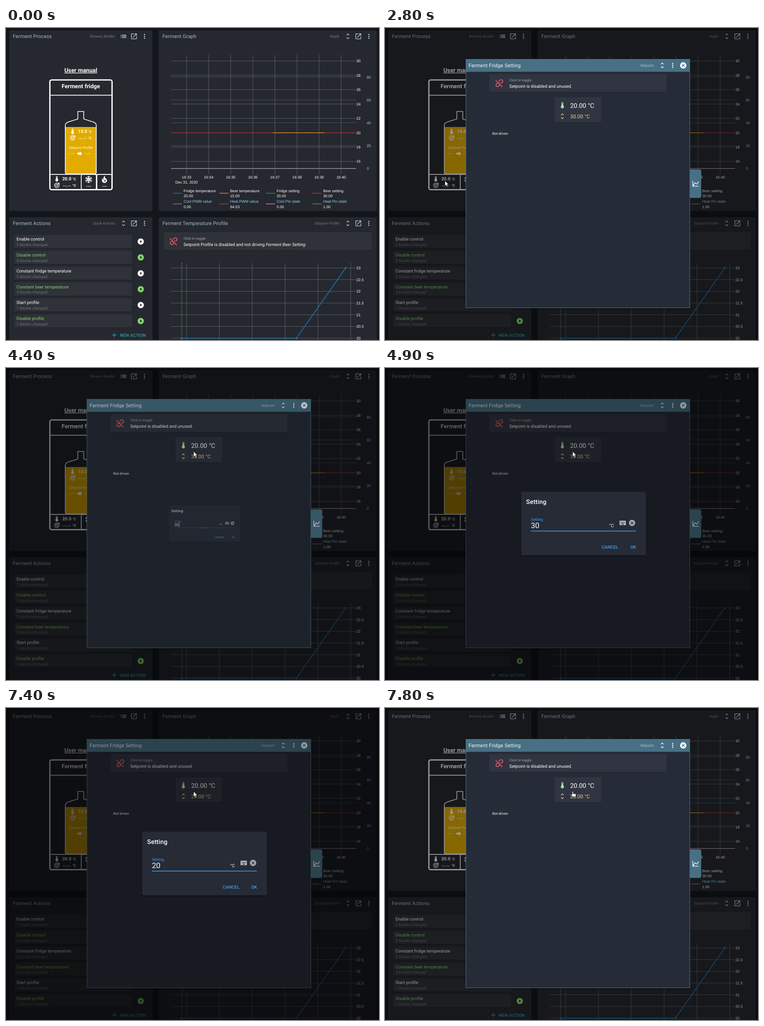
An HTML page for the animation above (8000 ms loop, 818 by 684 pixels).

```html
<!DOCTYPE html>
<html lang="en">
<head>
<meta charset="utf-8">
<title>Fermentation dashboard</title>
<style>
html, body { margin: 0; width: 100%; height: 100%; overflow: hidden; background: #13171c; }
svg { display: block; width: 100vw; height: 100vh; font-family: Roboto, sans-serif; text-rendering: geometricPrecision; }
.plot { font-family: "Liberation Sans", Arial, sans-serif; font-size: 8.3px; }
</style>
</head>
<body>
<svg id="stage" viewBox="0 0 818 684"></svg>
<script>
const PANEL = '#25282f', PAGE = '#13171c', TITLE = '#a3bdca', ICON = '#b4cbd6';
const GREEN = '#82d46b', TEAL = '#487084', BLUE = '#429ff0', SKY = '#93d5f3', RED = '#ef5f62';
const SERIES = ['#1f77b4', '#ff7f0e', '#2ca02c', '#d62728', '#9467bd', '#8c564b', '#e377c2', '#7f7f7f'];

const keys = [5, 8, 11, 14, 17].map(x => `M${x} 8h2v2h-2zM${x} 11h2v2h-2z`).join('');
const ICONS = {
  list: 'M3 13h2v-2H3zm0 4h2v-2H3zm0-8h2V7H3zm4 4h14v-2H7zm0 4h14v-2H7zM7 7v2h14V7z',
  open: 'M19 19H5V5h7V3H5a2 2 0 0 0-2 2v14a2 2 0 0 0 2 2h14a2 2 0 0 0 2-2v-7h-2zM14 3v2h3.59l-9.83 9.83 1.41 1.41L19 6.41V10h2V3z',
  more: [6, 12, 18].map(y => `M10 ${y}a2 2 0 1 0 4 0a2 2 0 1 0-4 0z`).join(''),
  unfold: 'M12 5.83L15.17 9l1.41-1.41L12 3 7.41 7.59 8.83 9zm0 12.34L8.83 15l-1.42 1.41L12 21l4.59-4.59L15.17 15z',
  play: 'M10 16.5v-9l6 4.5zM12 2a10 10 0 1 0 0 20a10 10 0 1 0 0-20z',
  close: 'M12 2a10 10 0 1 0 0 20a10 10 0 1 0 0-20zM17 15.6L15.6 17 12 13.4 8.4 17 7 15.6 10.6 12 7 8.4 8.4 7 12 10.6 15.6 7 17 8.4 13.4 12z',
  thermo: 'M15 13V5a3 3 0 0 0-6 0v8a5 5 0 1 0 6 0zM12 4a1 1 0 0 1 1 1v3h-2V5a1 1 0 0 1 1-1z',
  arrow: 'M4 15V9h8V4.16L19.84 12 12 19.84V15z',
  plus: 'M19 13h-6v6h-2v-6H5v-2h6V5h2v6h6z',
  chart: 'M16 11.78l4.24-7.33 1.73.99-5.23 9.06-6.51-3.75L5.46 19H22v2H2V3h2v14.54L9.5 8z',
  fire: 'M14 2C12.4 5 13.2 7.5 15 8.9C17.5 10.7 19 12.3 19 15A7 6.8 0 0 1 5 14.5C5 12 6 10 7.4 8.6C7 10.5 7.2 12.8 8.6 14C9.6 13.6 9 12.5 8.8 11.5C8.2 8 10.5 4 14 2ZM12.4 11C11.8 13 13 14 12.6 15.5C12.3 16.5 11.6 17 10.5 17.3C12 18.6 15.4 18.2 15.4 15C15.2 13.2 13 12.8 12.4 11Z',
  keyboard: 'M20 5H4a2 2 0 0 0-2 2v10a2 2 0 0 0 2 2h16a2 2 0 0 0 2-2V7a2 2 0 0 0-2-2zM8 15h8v2H8z' + keys
};

const icon = (name, x, y, fill = ICON, k = .69) =>
  `<path d="${ICONS[name]}" fill="${fill}" fill-rule="evenodd" transform="translate(${x} ${y}) scale(${k}) translate(-12 -12)"/>`;
const text = (x, y, s, size, fill = '#fff', more = '') =>
  `<text x="${x}" y="${y}" font-size="${size}" fill="${fill}" ${more}>${s}</text>`;
const label = (x, y, s, fill = '#fff', more = '') => `<text x="${x}" y="${y}" fill="${fill}" ${more}>${s}</text>`;
const box = (x, y, w, h, fill, more = '') =>
  `<rect x="${x}" y="${y}" width="${w}" height="${h}" fill="${fill}" ${more}/>`;
const stroke = (d, color, w = 1, more = '') =>
  `<path d="${d}" fill="none" stroke="${color}" stroke-width="${w}" ${more}/>`;
const range = (n, f) => Array.from({ length: n }, (_, i) => f(i)).join('');
const MID = 'text-anchor="middle"', END = 'text-anchor="end"', BOLD = 'font-weight="700"', ITALIC = 'font-style="italic"';

// A raised card with a soft lower edge
const card = (x, y, w, h, fill) =>
  box(x, y + 1.2, w, h, '#000', 'rx="2.5" opacity=".25"') + box(x, y, w, h, fill, 'rx="2.5"');

function panel(x, y, w, h, title, kind, first) {
  const r = x + w;
  const right = r - (w > 400 ? 82 : first === 'list' || first === 'unfold' ? 82 : 0);
  return box(x, y, w, h, PANEL, 'rx="2"') +
    text(x + 8, y + 17, title, 11.1, TITLE, 'letter-spacing=".1"') +
    text(right, y + 16, kind, 8.2, '#777a80', ITALIC + ' ' + END) +
    icon(first, r - 63.3, y + 13.3) + icon('open', r - 40.3, y + 13.3) + icon('more', r - 17.2, y + 13.3);
}

const target = (x, y) => `<g transform="translate(${x} ${y})">` +
  stroke('M1.6-4.9A5.2 5.2 0 1 0 5-1.4M.6-2.6A2.7 2.7 0 1 0 2.7-.5M0 0L3.6-3.6M3-5.8V-3H5.8L4.6-1.9M3-3L5.5-5.5', '#fff', 1.15) + '</g>';

function linkOff(x, y) {
  return `<g transform="translate(${x} ${y}) scale(.9) translate(-11.5 -12)" stroke-linejoin="round">` +
    stroke('M10 8.3L13.4 4.9a4 4 0 0 1 5.7 5.7L17.4 12.3M13 16.4L10.6 19.1a4 4 0 0 1-5.7-5.7L6.6 11.7M9.9 14.1A4 4 0 0 1 8.7 11.2M14.1 9.9A4 4 0 0 1 15.2 13.3M2.6 4.6L19.4 21.4', RED, 1.85) + '</g>';
}

function reading(x, y, value) {
  return icon('thermo', x - 22, y, '#fff', .6) + target(x - 22, y + 14.5) +
    text(x, y + 3.8, value, 9.9, '#fff', MID + ' ' + BOLD) +
    text(x, y + 18.2, '--.--', 9.3, '#fff', MID + ' ' + BOLD) +
    [3.3, 17.7].map(d => text(x + 12, y + d, '°C', 7.7, '#fff', BOLD)).join('');
}

function fridge() {
  const flake = range(6, i => `<path transform="rotate(${i * 60})" d="M0 0V-8M-2.6-7L0-4.7L2.6-7M-2-3.6L0-2L2-3.6"/>`);
  const bottle = 'M157.5 183H170.5V199.5L192 206.3Q198 208.6 198 214V316q0 4-4 4H134q-4 0-4-4V214Q130 208.6 136 206.3L157.5 199.5Z';
  return text(164, 97, 'User manual', 12.75, '#fff', MID + ' ' + BOLD + ' text-decoration="underline"') +
    text(164, 132, 'Ferment fridge', 12.65, '#fff', MID + ' ' + BOLD) +
    '<path d="M130 217H198V316q0 4-4 4H134q-4 0-4-4Z" fill="#e1ab00"/>' +
    stroke(bottle, '#fff', 1.6) +
    stroke('M96 147.3H232M96 320.8H232', '#fff', 1.7) +
    box(165, 321, 33, 33, 'none', 'rx="3.5" stroke="#fff" stroke-width="1.7"') +
    box(199.3, 321, 33, 33, 'none', 'rx="3.5" stroke="#fff" stroke-width="1.7"') +
    box(96.2, 113.8, 136.4, 240.6, 'none', 'rx="4" stroke="#fff" stroke-width="2.8"') +
    reading(168, 226.5, '15.0') + reading(133.4, 330.5, '20.0') +
    text(164, 264.5, 'Setpoint Profile', 7.66, '#fff', MID) +
    text(144, 278, '--.--', 9.8, '#fff', MID) + text(179, 278, '--.--', 9.8, '#fff', MID) +
    icon('arrow', 161.6, 275.3, '#fff', .66) +
    `<g transform="translate(181.3 332)" fill="none" stroke="#fff" stroke-width="1.2">${flake}</g>` +
    icon('fire', 216, 332, '#fff', .82) +
    text(181.3, 350, '---', 9.3, '#fff', MID + ' ' + BOLD) + text(216, 350, '---', 9.3, '#fff', MID + ' ' + BOLD);
}

function graph() {
  const times = range(8, i => {
    const x = 396 + i * 48.43;
    return stroke(`M${x} 59V321`, '#5b5e63') + label(x, 330, '16:' + (33 + i), '#fff', MID);
  });
  const left = range(8, i => {
    const y = 72.3 + i * 31.45;
    return stroke(`M362 ${y}H768`, '#5b5e63') + label(768.5, y + 3, 30 - 2 * i);
  });
  const right = range(5, i => {
    const y = 107.5 + i * 50.13;
    return stroke(`M362 ${y}H768`, '#465660') + label(i < 4 ? 791 : 791.3, y + 3, 80 - 20 * i, SKY);
  });
  const names = ['Fridge temperature', 'Beer temperature', 'Fridge setting', 'Beer setting',
    'Cool PWM value', 'Heat PWM value', 'Cool Pin state', 'Heat Pin state'];
  const values = ['20.00', '15.00', '20.00', '30.00', '0.00', '94.03', '0.00', '1.00'];
  const legend = range(8, i => {
    const x = 366 + (i % 4) * 102, y = i < 4 ? 360 : 383.3;
    return stroke(`M${x} ${y + 2.3}h20`, SERIES[i], 1.4) +
      label(x + 23.5, y, names[i], i < 4 ? '#fff' : SKY) + label(x + 23.5, y + 11.2, values[i]);
  });
  return '<g class="plot">' + right + left + times + label(396, 341, 'Dec 31, 2020', '#fff', MID) +
    stroke('M362 229.6H768', '#ab373b', 1.4) + stroke('M585 229.6H699', '#f0981e', 1.4) +
    stroke('M362 308H768', '#a18b93', 1.5) + legend + '</g>';
}

function actions() {
  const rows = [['Enable control', 2], ['Disable control', 3], ['Constant fridge temperature', 3],
    ['Constant beer temperature', 3], ['Start profile', 1], ['Disable profile', 1]];
  return rows.map(([name, n], i) => {
    const y = 453.6 + i * 34.84, color = i % 2 ? GREEN : '#fff';
    return card(18, y, 258, 28.8, '#2f3239') + text(23, y + 12.5, name, 9.58, color) +
      text(23, y + 24.3, n + ' blocks changed', 8.2, '#74777c', 'letter-spacing=".27"') +
      icon('play', 295.5, y + 14.5, color);
  }).join('') + icon('plus', 237.5, 673, '#309ba5') +
    text(249.7, 676.7, 'NEW ACTION', 9.5, '#309ba5', 'font-weight="500"');
}

function toggle(x, y, w, h, fill, message) {
  return card(x, y, w, h, fill) + linkOff(x + 21.4, y + h / 2) +
    text(x + 43.5, y + 15.7, 'Click to toggle', 7.7, '#a1a4a9') + text(x + 43.5, y + 30, message, 9.55);
}

function profile() {
  const rows = range(7, i => {
    const y = 526 + i * 25.67;
    return stroke(`M362 ${y}H768`, '#5b5e63') + label(768.5, y + 3, 23 - i / 2);
  });
  const dots = [[385, 680], [637, 680], [745, 526]];
  return toggle(345.7, 448, 456.5, 39, '#2f3239',
    'Setpoint Profile is disabled and not driving <tspan font-style="italic">Ferment Beer Setting</tspan>.') +
    '<g class="plot">' + range(6, i => stroke(`M${396 + i * 72} 515V684`, '#5b5e63')) + rows +
    stroke('M385.5 515V684', '#2fae35', 1.5, 'stroke-dasharray="2.2 2.2"') +
    stroke('M' + dots.join('L'), SERIES[0], 1.5) +
    dots.map(([x, y]) => `<circle cx="${x}" cy="${y}" r="2.1" fill="${SERIES[0]}"/>`).join('') + '</g>';
}

function settings() {
  return box(177, 70, 492, 547, '#000', 'rx="2" opacity=".25"') +
    '<path d="M668 310h21.500q4 0 4 4v54.500q0 4-4 4H668z" fill="' + TEAL + '"/>' + icon('chart', 681.3, 341.3, '#fff') +
    box(177.5, 68.500, 491, 545, '#262c37', `stroke="${TEAL}"`) + box(177, 68, 492, 28, TEAL) +
    text(183.3, 86, 'Ferment Fridge Setting', 11.1, '#f2f5f7', 'letter-spacing=".1"') +
    text(589, 84.600, 'Setpoint', 8.2, '#b1c3cc', ITALIC + ' ' + END) +
    icon('unfold', 608, 82, '#fff') + icon('more', 631, 82, '#fff') + icon('close', 654, 82, '#fff') +
    toggle(229, 101.300, 388, 39.200, '#303541', 'Setpoint is disabled and unused.') +
    card(372, 152, 102, 55, '#303541') + icon('thermo', 389, 169.500, '#b3deab') +
    text(406, 174.600, '20.00 °C', 14, '#fff') +
    icon('unfold', 389, 193.500, '#edd08a') + text(406, 198.300, '', 11.4, '#edd08a', 'id="value"') +
    text(235, 234, 'Not driven', 7.8, '#fff', ITALIC);
}

function editor() {
  return box(297.5, 273, 275, 140, '#000', 'rx="3" opacity=".3"') + box(298.5, 271.3, 273.700, 139.400, '#262b36', 'rx="2.500"') +
    text(309.500, 298, 'Setting', 13.7, '#fff', 'font-weight="500" letter-spacing=".15"') +
    text(320.300, 335.300, 'Setting', 8.3, BLUE) + text(320, 350.800, '', 16.6, '#fff', 'id="field"') +
    box(320, 335, 1, 20, '#fff', 'id="caret"') +
    '<g id="suffix">' + text(491.800, 348.600, '°C', 10) + icon('keyboard', 521.300, 339.700, '#c2c5c9') + '</g>' +
    `<g id="clear">${icon('close', 541.800, 339.700, '#a9abb0')}</g>` +
    stroke('M320 357.500H550', '#70757d', .7) +
    `<g id="underline">${stroke('M-115 0H115', BLUE, 1.500)}</g>` +
    text(475.300, 396.400, 'CANCEL', 9.6, BLUE, 'font-weight="500"') + text(538, 396.400, 'OK', 9.6, BLUE, 'font-weight="500"');
}

const stage = document.getElementById('stage');
stage.innerHTML = box(0, 0, 818, 684, PAGE) +
  panel(7, 5, 314, 396, 'Ferment Process', 'Brewery Builder', 'list') + fridge() +
  panel(335, 5, 478, 396, 'Ferment Graph', 'Graph', 'unfold') + graph() +
  panel(7, 415, 314, 280, 'Ferment Actions', 'Quick Actions', 'unfold') + actions() +
  panel(335, 415, 478, 280, 'Ferment Temperature Profile', 'Setpoint Profile', 'unfold') + profile() +
  `<g id="settings">${box(0, 0, 818, 684, '#000', 'opacity=".4"')}${settings()}</g>` +
  box(0, 0, 818, 684, '#000', 'id="shade"') + `<g id="editor">${editor()}</g>` +
  '<g id="cursor" stroke="#15181c" stroke-width=".7" fill="#fff" stroke-linejoin="round">' +
  '<path id="pointer" d="M0 0V11.300L2.600 8.900L4.300 13L6.200 12.200L4.400 8.200H8Z"/>' +
  '<path id="hand" d="M-.9.700Q.2-.9 1.300.700V4.600L6.200 5.500Q7.800 6 7.600 7.600L6.300 11.700H-.3L-3.300 7.300Q-3 5.800-1.800 6.500L-.9 7.400Z"/></g>';

const ui = {};
stage.querySelectorAll('[id]').forEach(n => ui[n.id] = n);
const show = (node, on) => node.setAttribute('display', on ? 'inline' : 'none');
const clamp = v => Math.min(1, Math.max(0, v));
const smooth = p => p * p * (3 - 2 * p);
const mix = (a, b, p) => a + (b - a) * p;

// CSS "ease": cubic-bezier(.25, .1, .25, 1), solved by bisection
function ease(x) {
  let lo = 0, hi = 1;
  const curve = (u, a, b) => 3 * u * (1 - u) ** 2 * a + 3 * u * u * (1 - u) * b + u ** 3;
  for (let i = 0; i < 24; i++) {
    const u = (lo + hi) / 2;
    if (curve(u, .25, .25) < x) lo = u; else hi = u;
  }
  return curve(lo, .1, 1);
}

function draw(time) {
  const t = Math.floor(time / 100) * 100;

  const go = smooth(clamp((t - 900) / 800)), next = smooth(clamp((t - 3100) / 600));
  const x = t < 3200 ? mix(29, 131.5, go) : mix(131.5, 411.500, next);
  const y = t < 1800 ? mix(2, 332, go) : mix(335, 183, next);
  const hand = (t >= 1800 && t < 2800) || (t >= 3800 && t < 4300) || t >= 7800;
  show(ui.cursor, t >= 900);
  show(ui.hand, hand);
  show(ui.pointer, !hand);
  ui.cursor.setAttribute('transform', `translate(${x} ${y})`);

  show(ui.settings, t >= 2800);
  ui.value.textContent = (t < 7400 ? 30 : 20) + '.00 °C';

  const p = t < 7400 ? ease(clamp((t - 4300) / 300)) : 1 - ease(clamp((t - 7400) / 300));
  ui.shade.setAttribute('opacity', .4 * p);
  show(ui.editor, p > .001);
  ui.editor.setAttribute('opacity', p);
  ui.editor.setAttribute('transform', `translate(435.3 341) scale(${p}) translate(-435.3 -341)`);
  const line = ease(clamp((t - 4350) / 360));
  ui.underline.setAttribute('transform', `translate(435 357.5) scale(${line} 1)`);

  const typed = t < 5700 ? '30' : t < 5900 ? '3' : t < 6600 ? '' : t < 6800 ? '2' : '20';
  ui.field.textContent = typed;
  ui.caret.setAttribute('x', [320, 330, 339][typed.length]);
  show(ui.caret, t < 4900 || (t >= 5500 && t < 6100) || (t >= 6600 && t < 7300));
  show(ui.clear, typed);
  ui.suffix.setAttribute('transform', `translate(${typed ? 0 : 20.5} 0)`);
}

const start = performance.now();
function tick() {
  draw((performance.now() - start) % 8000);
  requestAnimationFrame(tick);
}
tick();
</script>
</body>
</html>
```
